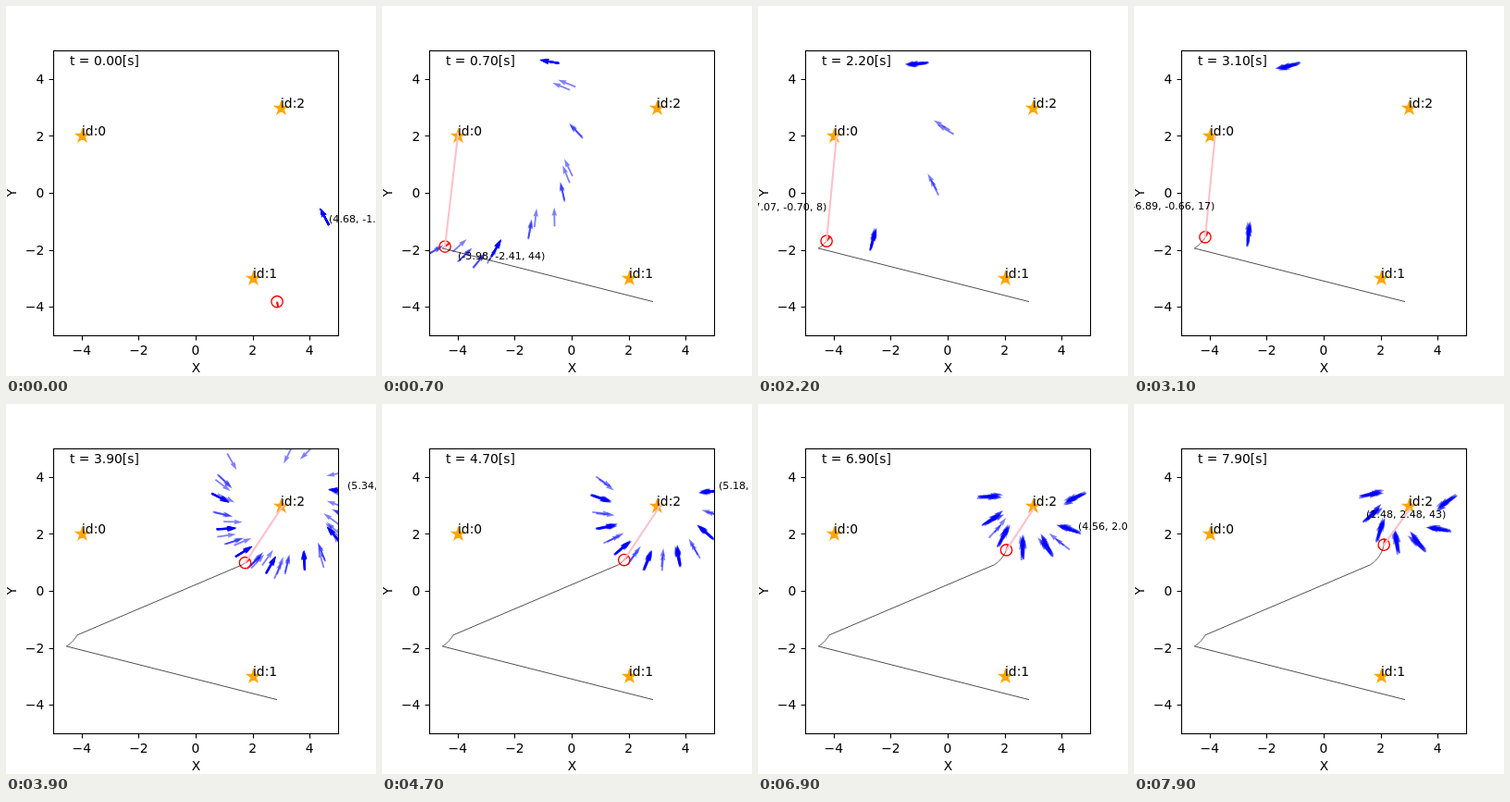
An HTML page that plays this animation: 400 px wide and 400 px high, repeating every 8000 ms.

```html
<!DOCTYPE html>
<html lang="en">
<head>
<meta charset="utf-8">
<title>Particle localisation</title>
<style>
  html, body { margin: 0; width: 100%; height: 100%; overflow: hidden; background: #fff; }
  svg { display: block; width: 100vw; height: 100vh; }
  text { font: 13.89px "DejaVu Sans", sans-serif; }
  #label { font-size: 11.11px; }
</style>
</head>
<body>
<svg id="stage" viewBox="0 0 400 400">
  <defs><clipPath id="plot"><rect x="51" y="48" width="308" height="308"/></clipPath></defs>
  <g id="stars" fill="orange" stroke="orange" stroke-width="1.39"></g>
  <g id="arrows" fill="blue" fill-opacity="0.5" clip-path="url(#plot)"></g>
  <g fill="none" clip-path="url(#plot)">
    <circle id="body" r="6.16" stroke="red" stroke-width="1.39"/>
    <path id="nose" stroke="red" stroke-width="2.08"/>
    <path id="trail" stroke="#000" stroke-width="0.69" stroke-linejoin="round"/>
    <path id="sight" stroke="pink" stroke-width="2.08" stroke-linecap="square"/>
  </g>
  <g id="axes" fill="none" stroke="#000" stroke-width="1.11">
    <rect x="51.5" y="48.5" width="308" height="308"/>
  </g>
  <g id="texts"></g>
  <text id="clock" x="69" y="64"></text>
  <text id="label"></text>
</svg>
<script>
const STEP = 100, STEPS = 80, SCALE = 30.8, TURN = 10;
const $ = id => document.getElementById(id);
const px = x => 205 + SCALE * x;
const py = y => 202 - SCALE * y;
const snap = v => Math.round(v) + 0.5;
const rad = deg => deg * Math.PI / 180;
const rand = n => { const s = Math.sin(n * 127.1 + 11.7) * 43758.5453; return s - Math.floor(s); };
const spread = n => 2 * rand(n) - 1;

function add(parent, tag, attrs, text) {
  const el = document.createElementNS("http://www.w3.org/2000/svg", tag);
  for (const key in attrs) el.setAttribute(key, attrs[key]);
  if (text) el.textContent = text;
  return $(parent).appendChild(el);
}

// Constant speed and turn rate: travel the chord along the mean heading.
function advance({ x, y, deg }, dt, speed) {
  const mid = rad(deg + TURN * dt / 2);
  return { x: x + speed * dt * Math.cos(mid), y: y + speed * dt * Math.sin(mid), deg: deg + TURN * dt };
}

const landmarks = [[-4, 2], [2, -3], [3, 3]];

// The robot is carried to a new place at the start of each leg, and the
// particles are reset to a ring around the landmark it then sees.
// Ring bearings and headings hold at time `ref`.
const legs = [
  { start: 0, end: 0, x: 2.86, y: -3.82, deg: -80 },
  {
    start: 0.1, end: 3.1, x: -4.536, y: -1.945, deg: 31, target: landmarks[0],
    ring: { ref: 1.4, radius: 4.25, from: 37, to: -140, bow: 43, count: 9, stride: 4, turn: 140, last: 8, ease: 0.34 }
  },
  {
    start: 3.2, end: 7.9, x: 1.633, y: 0.912, deg: 32, target: landmarks[2],
    ring: { ref: 4.7, radius: 2.28, from: 373, to: 155, bow: 26, count: 14, stride: 2, turn: 170, last: 10, ease: 7 }
  }
];
const legAt = t => legs.filter(leg => leg.start <= t + 1e-6).pop();
const robotAt = t => { const leg = legAt(t); return advance(leg, t - leg.start, 0.182); };

function onRing({ target, ring }, bearing, radius) {
  return {
    ref: ring.ref, deg: bearing + ring.turn,
    x: target[0] + radius * Math.cos(rad(bearing)),
    y: target[1] + radius * Math.sin(rad(bearing))
  };
}

// Every stride-th cluster is dense and lives on; the others fade out by resampling.
function makeClusters(leg, seed) {
  const { ring, start, end } = leg;
  return Array.from({ length: ring.count }, (_, i) => {
    const u = i / (ring.count - 1), dense = i % ring.stride === 0;
    const bearing = ring.from + (ring.to - ring.from) * u - ring.bow * Math.sin(Math.PI * u) * (1 - u);
    const share = dense ? 1 : 0.15 + 0.7 * rand(seed + i);
    return {
      ...onRing(leg, bearing, ring.radius + 0.06 * spread(seed + i + 50)),
      size: dense ? 11 : 2, dies: ring.ref + (end - ring.ref) * share
    };
  });
}

// Lone particles from the reset that resampling soon removes.
function makeStrays(leg, seed) {
  const { ring, start } = leg;
  return Array.from({ length: 60 }, (_, i) => {
    const n = seed + i * 4;
    return {
      ...onRing(leg, 360 * rand(n), ring.radius + 0.35 * spread(n + 1)),
      size: 1, dies: start + (ring.ref - start - 0.1) * rand(n + 2) ** 1.5
    };
  });
}

legs.forEach((leg, i) => {
  leg.clusters = leg.ring ? makeClusters(leg, 40 * i) : [{ ref: 0, x: 4.68, y: -1.13, deg: 118, size: 30, dies: 0 }];
  leg.strays = leg.ring ? makeStrays(leg, 400 * i) : [];
});

function build() {
  landmarks.forEach(([x, y], id) => {
    const points = Array.from({ length: 10 }, (_, i) => {
      const r = i % 2 ? 2.65 : 6.94, a = Math.PI * i / 5;
      return [snap(px(x)) + r * Math.sin(a), snap(py(y)) - r * Math.cos(a)];
    });
    add("stars", "polygon", { points: points.join(" ") });
    add("texts", "text", { x: Math.round(px(x)), y: Math.round(py(y)) }, "id:" + id);
  });
  for (const v of [-4, -2, 0, 2, 4]) {
    const name = String(v).replace("-", "\u2212");
    add("axes", "path", { d: `M${snap(px(v))} 356.5v4.9M51.5 ${snap(py(v))}h-4.9` });
    add("texts", "text", { x: px(v), y: 377, "text-anchor": "middle" }, name);
    add("texts", "text", { x: 41.3, y: Math.round(py(v) + 5.2), "text-anchor": "end" }, name);
  }
  add("texts", "text", { x: 205.6, y: 396, "text-anchor": "middle" }, "X");
  add("texts", "text", { transform: "translate(11 202) rotate(-90)", "text-anchor": "middle" }, "Y");
}

const pool = [];
function arrow(i) {
  return pool[i] ||= add("arrows", "path", {
    d: "M0 -.92H12.2L11.3 -2.77L20.5 0L11.3 2.77L12.2 .92H0Z"
  });
}

// The labelled cluster wanders along the ring, skipping those that are gone.
function leaderAt(leg, t) {
  const { ring, clusters, start, end } = leg;
  const goal = ring ? Math.round(ring.last * ((t - start) / (end - start)) ** ring.ease) : 0;
  const distance = c => Math.abs(clusters.indexOf(c) - goal);
  return clusters.filter(c => c.dies >= t - 1e-6).reduce((a, b) => distance(b) < distance(a) ? b : a);
}

function drawParticles(t) {
  const leg = legAt(t), reach = Math.min(0.13, 0.045 * (t - leg.start));
  let used = 0;
  for (const c of [...leg.strays, ...leg.clusters]) {
    if (c.dies < t - 1e-6) continue;
    const pose = advance(c, t - c.ref, 0.2), a = rad(pose.deg);
    for (let k = 0; k < c.size; k++) {
      const seed = c.x * 31 + c.y * 17 + k * 5;
      const along = c.size > 1 ? reach * (2 * k / (c.size - 1) - 1) : 0;
      const side = 0.3 * reach * spread(seed);
      const x = pose.x + along * Math.cos(a) - side * Math.sin(a);
      const y = pose.y + along * Math.sin(a) + side * Math.cos(a);
      const deg = pose.deg + 45 * reach * spread(seed + 2);
      const el = arrow(used++);
      el.setAttribute("transform", `translate(${px(x)} ${py(y)}) rotate(${-deg})`);
      el.style.display = "";
    }
  }
  for (let i = used; i < pool.length; i++) pool[i].style.display = "none";

  const leader = leaderAt(leg, t);
  const { x, y, deg } = advance(leader, t - leader.ref, 0.2);
  const turn = Math.round(((deg + 180) % 360 + 360) % 360 - 180);
  $("label").setAttribute("x", Math.round(px(x)));
  $("label").setAttribute("y", Math.round(py(y) - 2.6));
  $("label").textContent = `(${x.toFixed(2)}, ${y.toFixed(2)}, ${turn})`;
}

function drawRobot(step) {
  const t = step / 10, { target } = legAt(t);
  const { x, y, deg } = robotAt(t), cx = px(x), cy = py(y);
  const ray = (r, a) => `M${cx} ${cy}l${r * Math.cos(rad(a))} ${-r * Math.sin(rad(a))}`;
  $("body").setAttribute("cx", cx);
  $("body").setAttribute("cy", cy);
  $("nose").setAttribute("d", ray(6.16, deg));

  const path = Array.from({ length: step + 1 }, (_, i) => robotAt(i / 10));
  $("trail").setAttribute("d", "M" + path.map(p => `${px(p.x)} ${py(p.y)}`).join("L"));

  // Noisy range and bearing of the landmark in view.
  if (!target) return $("sight").setAttribute("d", "");
  const dx = target[0] - x, dy = target[1] - y;
  const range = Math.hypot(dx, dy) * (0.98 + 0.1 * spread(step + 900));
  const bearing = Math.atan2(dy, dx) * 180 / Math.PI - 1.5 + 2 * spread(step + 990);
  $("sight").setAttribute("d", ray(SCALE * range, bearing));
}

let shown = -1;
function draw(now) {
  const step = Math.floor(now / STEP) % STEPS;
  if (step === shown) return;
  shown = step;
  $("clock").textContent = `t = ${(step / 10).toFixed(2)}[s]`;
  drawParticles(step / 10);
  drawRobot(step);
}

build();
draw(0);
let begin;
requestAnimationFrame(function loop(now) {
  begin ??= now;
  draw(Math.max(0, now - begin));
  requestAnimationFrame(loop);
});
</script>
</body>
</html>
```
